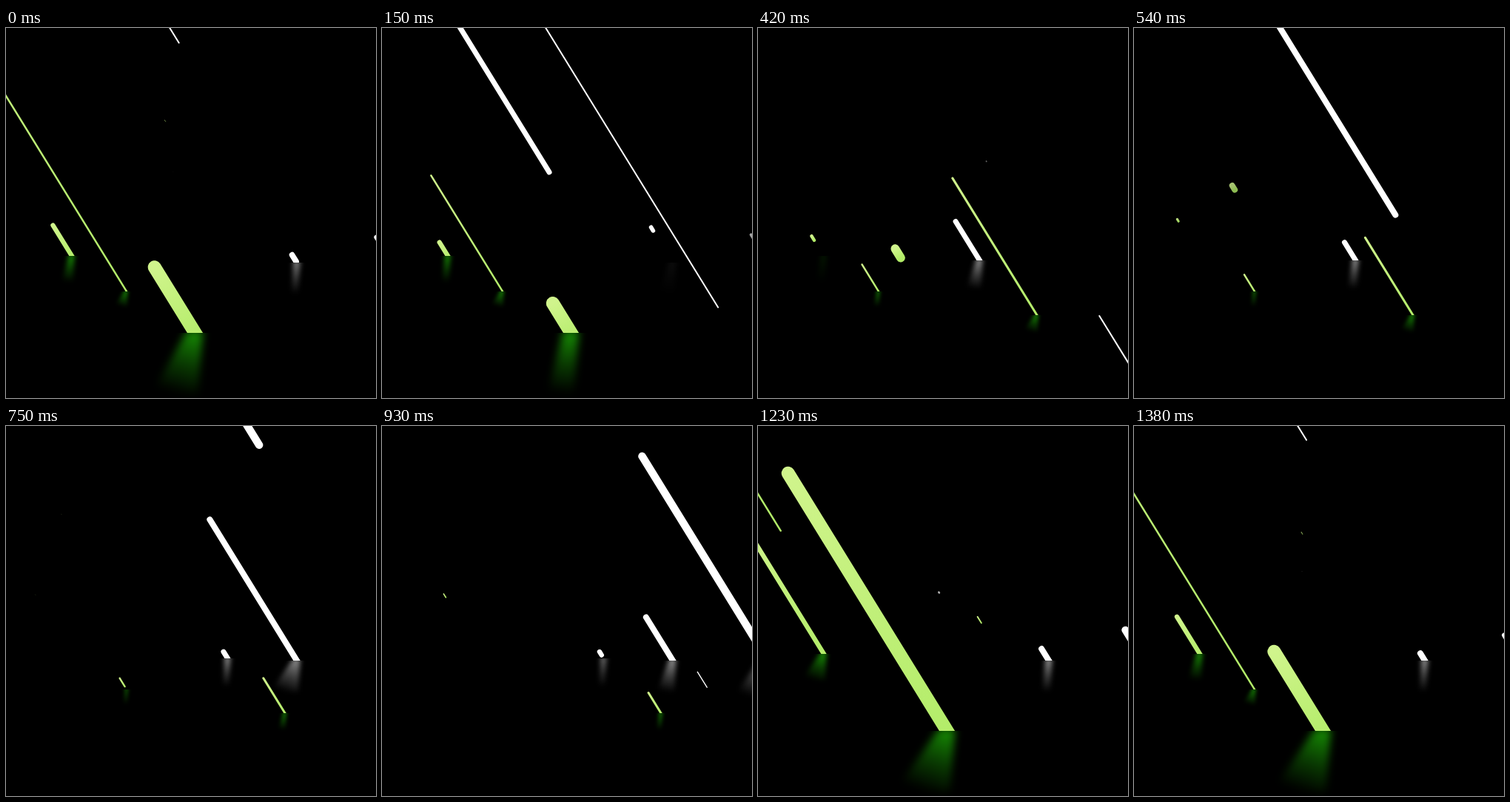
Recreate the animation shown at these times as an HTML page with a canvas. Size 500x500 px, loop 1.41 s.

```html
<!DOCTYPE html>
<html>
<head>
<meta charset="utf-8">
<title>Falling light beams</title>
<style>
html, body { margin: 0; height: 100%; overflow: hidden; background: #000; }
canvas { display: block; }
</style>
</head>
<body>
<canvas id="stage" width="500" height="500"></canvas>
<script>
const ctx = document.getElementById('stage').getContext('2d');
const LOOP = 1410, STEP = 30;
const DX = 0.525, DY = 0.851;                // unit direction of travel
const FALL = 260, SPEED = 2.8, TOP = 623;    // ms, px per ms, highest start
const RISE = 560;                            // ms from lift-off to vanishing

// x, y: impact point; w: thickness; land: impact time; life: ms on the ground;
// length: at impact; slow: ms scale of the shrinking; rise: height of the rebound
const beams = [
  { x: 520, y: 314, w: 10.5, land: 871, life: 330, length: 602, slow: 253, rise: 45 },
  { x: 560, y: 549, w: 2, land: 1632, life: 538, length: 599, slow: 420, rise: 800 },
  { x: 393, y: 317, w: 8, land: 567, life: 823, length: 1695, slow: 190, rise: 176 },
  { x: 299.5, y: 314, w: 7, land: 200, life: 685, length: 620, slow: 190, rise: 142 },
  { x: 89, y: 308, w: 6.3, land: 1119, life: 554, length: 790, slow: 190, rise: 97, green: true },
  { x: 163, y: 356, w: 2.5, land: 1320, life: 818, length: 2134, slow: 190, rise: 395, green: true },
  { x: 377, y: 388, w: 3, land: 327, life: 696, length: 370, slow: 480, rise: 374, green: true },
  { x: 255.5, y: 412, w: 18, land: 1108, life: 530, length: 1812, slow: 190, rise: 347, green: true }
];

const clamp01 = v => Math.max(0, Math.min(1, v));

// Position of both ends above the ground, thickness and glow after `age` ms from impact
function poseAt(beam, age) {
  const { w, life, length, slow, rise } = beam;
  const size = length / (1 + clamp01(age / life) * life / slow) ** 3;
  if (age < 0) {
    const head = Math.min(TOP, -age * SPEED);
    return { head, tail: head + size, width: w, glow: clamp01(1 - head / 60), alpha: 1 };
  }
  if (age < life) return { head: -w, tail: size, width: w, glow: 1, alpha: 1 };
  const p = (age - life) / RISE;
  const head = rise * Math.sin(p * Math.PI / 2) ** 1.6;
  return {
    head,
    tail: head + size * (1 - p) ** 2,
    width: w * (1 - p),
    glow: clamp01(1 - 3 * p),
    alpha: clamp01(1.8 * (1 - p))
  };
}

function clipRows(top, bottom) {
  ctx.beginPath();
  ctx.rect(0, top, 500, bottom - top);
  ctx.clip();
}

function drawGlow({ x, y, w, green }, { tail, glow }) {
  if (!glow) return;
  const depth = 10 + 4 * w;
  const reach = 0.75 * depth * Math.min(1, tail / 130);
  const rgb = green ? '24,150,4' : '150,150,150';
  const light = ctx.createLinearGradient(x, y, x - reach * 0.5, y + depth);
  light.addColorStop(0, `rgba(${rgb},${0.9 * glow})`);
  light.addColorStop(0.5, `rgba(${rgb},${0.4 * glow})`);
  light.addColorStop(1, `rgba(${rgb},0)`);
  ctx.save();
  clipRows(y, 500);
  ctx.filter = `blur(${1.5 + depth / 22}px)`;
  ctx.fillStyle = light;
  ctx.beginPath();
  ctx.moveTo(x - w * 0.6, y - 3);
  ctx.lineTo(x + w * 0.6, y - 3);
  ctx.lineTo(x + w * 0.2, y + depth);
  ctx.lineTo(x - w * 0.5 - reach, y + depth);
  ctx.fill();
  ctx.restore();
}

function drawBeam(beam, age) {
  if (age < -FALL || age > beam.life + RISE) return;
  const { x, y, green } = beam;
  const pose = poseAt(beam, age);
  const from = [x - DX * pose.tail, y - DY * pose.tail];
  const to = [x - DX * pose.head, y - DY * pose.head];
  drawGlow(beam, pose);

  const body = ctx.createLinearGradient(...from, ...to);
  body.addColorStop(0, green ? '#d0f48c' : '#fff');
  body.addColorStop(1, green ? '#b2ec68' : '#fff');
  ctx.save();
  clipRows(0, y);
  ctx.globalAlpha = pose.alpha;
  ctx.lineCap = 'round';
  ctx.lineWidth = pose.width;
  ctx.strokeStyle = body;
  ctx.beginPath();
  ctx.moveTo(...from);
  ctx.lineTo(...to);
  ctx.stroke();
  ctx.restore();
}

const start = performance.now();
function frame(now) {
  const elapsed = Math.max(0, now - start) % LOOP;
  const t = Math.floor(elapsed / STEP) * STEP;
  ctx.fillStyle = '#000';
  ctx.fillRect(0, 0, 500, 500);
  for (const beam of beams) {
    drawBeam(beam, t - beam.land);
    drawBeam(beam, t + LOOP - beam.land);
  }
  requestAnimationFrame(frame);
}
frame(start);
</script>
</body>
</html>
```
